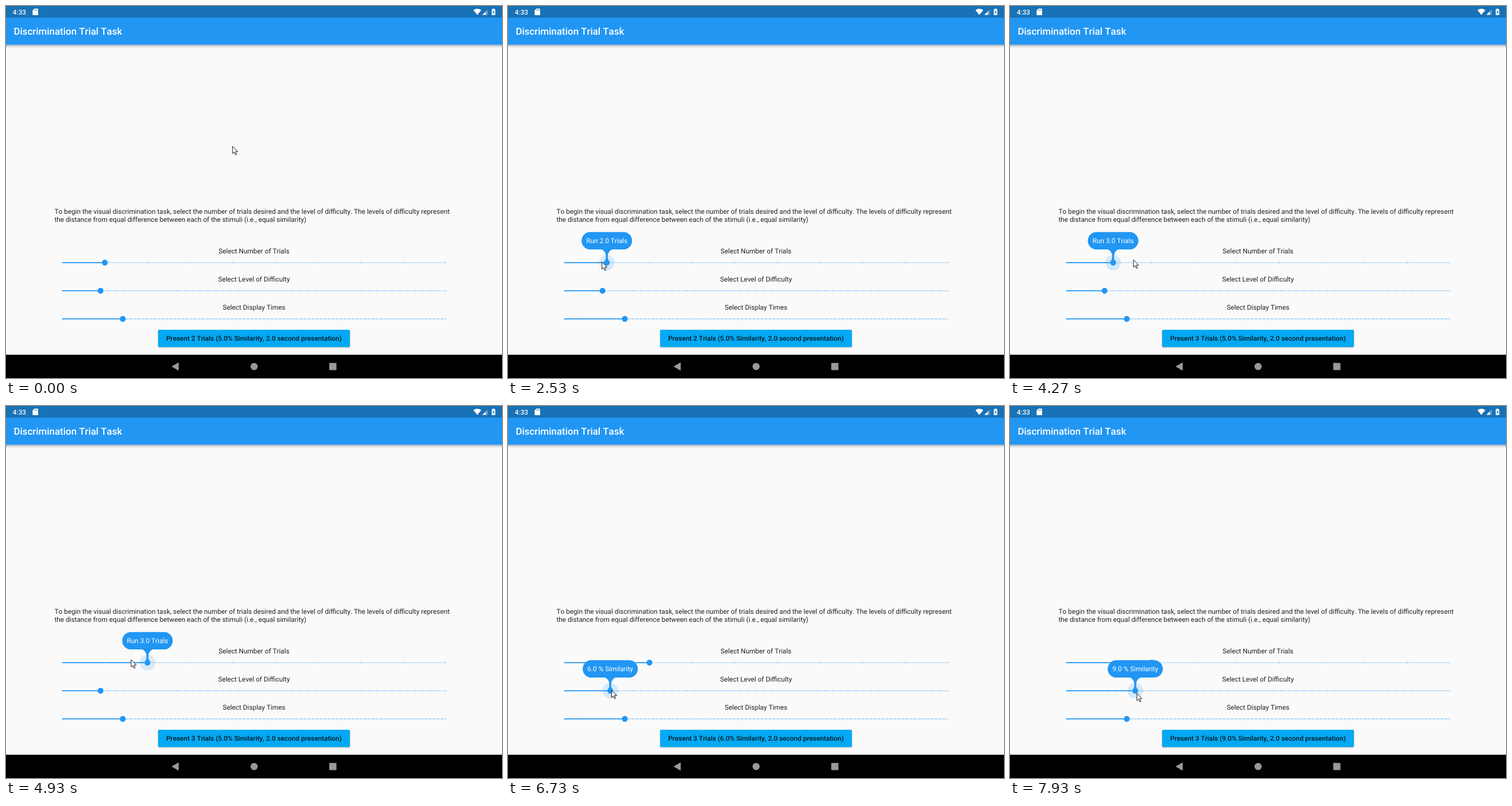
Animation of 864x648 px, one loop 8000 ms. Source, as an HTML page:

```html
<!DOCTYPE html>
<html lang="en">
<head>
<meta charset="utf-8">
<title>Discrimination Trial Task</title>
<style>
  html, body { margin: 0; width: 100%; height: 100%; overflow: hidden; background: #fafafa; }
  svg { display: block; width: 864px; height: 648px; }
  text {
    font: 400 11.8125px Roboto, sans-serif; font-kerning: none;
    fill: rgba(0, 0, 0, .87); text-rendering: geometricPrecision;
  }
  .mid { text-anchor: middle; }
  .medium { font-weight: 500; }
  .light { fill: #fff; }
  .title { font-size: 16.875px; }
  .button { filter: drop-shadow(0 1px 1.1px rgba(0, 0, 0, .3)); }
</style>
</head>
<body>
<svg viewBox="0 0 864 648">
  <defs>
    <linearGradient id="shade" x1="0" y1="0" x2="0" y2="1">
      <stop offset="0" stop-opacity=".32"/>
      <stop offset=".4" stop-opacity=".14"/>
      <stop offset="1" stop-opacity="0"/>
    </linearGradient>
  </defs>
  <rect width="864" height="648" fill="#fafafa"/>

  <rect y="67.5" width="864" height="6" fill="url(#shade)"/>
  <rect width="864" height="67.5" fill="#2196f3"/>
  <rect width="864" height="20.25" fill="#1971b6"/>
  <text class="medium light" x="11.8" y="14.8">4:33</text>
  <g fill="#fff">
    <path d="M49.4 4.6H55q1 0 1 1V15q0 1-1 1H47.3q-1 0-1-1V7.7Z"/>
    <path d="M814.2 7.3Q821 2.4 827.9 7.3L821 15.6Z"/>
    <path d="M839.3 6V15.5H829.8Z" opacity=".35"/>
    <path d="M835.6 9.7V15.5H829.8Z"/>
    <path d="M848 4.6h2.4v1h1q.9 0 .9.9v8.4q0 .9-.9.9h-4.4q-.9 0-.9-.9V6.5q0-.9.9-.9h1Z"/>
  </g>
  <path d="M849.7 7.2v3h1.5l-2.4 4v-3h-1.5Z" fill="#1971b6"/>
  <path d="M50 6.1v2.2M52 6.1v2.2M54 6.1v2.2" stroke="#1971b6" stroke-width=".9"/>
  <text class="medium light title" x="13.5" y="49.9">Discrimination Trial Task</text>

  <text x="84.4" y="362">To begin the visual discrimination task, select the number of trials desired and the level of difficulty. The levels of difficulty represent</text>
  <text x="84.4" y="375.6">the distance from equal difference between each of the stimuli (i.e., equal similarity)</text>

  <g id="sliders"></g>

  <rect class="button" x="265" y="564" width="334" height="30" rx="1.7" fill="#03a9f4"/>
  <text id="label" class="mid medium" x="431.9" y="583.2"></text>

  <rect y="607.5" width="864" height="40.5"/>
  <g fill="#999">
    <path d="M300.3 621.6V634.4L289.2 628Z" stroke="#999" stroke-linejoin="round"/>
    <circle cx="432.2" cy="628" r="6.2"/>
    <rect x="563.1" y="621.8" width="12.5" height="12.5" rx="1"/>
  </g>

  <g id="bubbles"></g>
  <path id="cursor" d="M0 0V12.7L2.9 10L5 14.8L7 13.9L4.9 9.3H9Z" fill="#fff" stroke="#000" stroke-width=".9"/>
</svg>
<script>
const FPS = 15, LOOP = 8000, LEFT = 97.9, WIDTH = 668.3, BLUE = '#2196f3';
const $ = id => document.getElementById(id);

function add(parent, tag, attrs, text = '') {
  const el = document.createElementNS('http://www.w3.org/2000/svg', tag);
  for (const k in attrs) el.setAttribute(k, attrs[k]);
  el.textContent = text;
  parent.append(el);
  return el;
}

// changes: clock ticks at which the value goes up by one
const sliders = [
  { name: 'Select Number of Trials', divs: 9, from: 1, value: 2,
    changes: [64], show: 32, hide: 74, half: 44, tip: v => `Run ${v}.0 Trials` },
  { name: 'Select Level of Difficulty', divs: 50, from: 0, value: 5,
    changes: [97, 103, 109, 114], show: 88, hide: Infinity, half: 48, tip: v => `${v}.0 % Similarity` },
  { name: 'Select Display Times', divs: 95, from: 0, value: 15, changes: [] }
];

// the pointer glides to x, y between two ticks; bend shapes the rise of y
const home = { x: 394.7, y: 244.4 };
const glides = [
  { start: 12, end: 26, x: 171.5, y: 444.2, bend: .6 },
  { start: 33, end: 45, x: 141.5, y: 447, bend: .5 },
  { start: 49, end: 66, x: 218, y: 442, bend: 1 },
  { start: 73, end: 86, x: 169.5, y: 494.8, bend: .4 },
  { start: 92, end: 119, x: 221.2, y: 500.6, bend: 2 }
];

function build(s, i) {
  const g = $('sliders'), end = LEFT + WIDTH;
  s.y = 447.1 + 49 * i;
  const line = (x2, color, extra) =>
    add(g, 'line', { x1: LEFT, x2, y1: s.y, y2: s.y, stroke: color, 'stroke-width': 1.7, ...extra });
  const dots = { 'stroke-dasharray': `0 ${WIDTH / s.divs}`, 'stroke-linecap': 'round', 'stroke-opacity': .54 };
  add(g, 'text', { class: 'mid', x: 432, y: s.y - 16.1 }, s.name);
  line(end, '#c6e2f8');
  line(end + .1, BLUE, dots);
  s.active = [line(end, BLUE), line(end, '#bbdefb', dots)];
  s.halo = add(g, 'circle', { cy: s.y, fill: BLUE, 'fill-opacity': .17 });
  s.thumb = add(g, 'circle', { cy: s.y, r: 5.1, fill: BLUE });
  if (!s.tip) return;
  s.bubble = add($('bubbles'), 'g', { fill: BLUE });
  add(s.bubble, 'rect', { x: -s.half, y: -53.4, width: 2 * s.half, height: 30.4, rx: 15.2 });
  add(s.bubble, 'path', { d: 'M-13-23.5A11.3 11.3 0 0 1-1.7-12.2V-8Q-1.8-5-3.6-3.600H3.6Q1.8-5 1.7-8V-12.2A11.3 11.3 0 0 1 13-23.5Z' });
  s.text = add(s.bubble, 'text', { class: 'mid light', y: -33.9 });
}

// three-tick step: first glimpse, nearly there, settled
const step = (n, start, first) => n < start ? 0 : [first, .9][n - start] ?? 1;

function update(s, n) {
  const moved = s.changes.reduce((sum, k) => sum + step(n, k, .1), 0);
  const x = LEFT + WIDTH * (s.value - s.from + moved) / s.divs;
  const now = s.value + s.changes.filter(k => n >= k).length;
  s.active.forEach(l => l.setAttribute('x2', x));
  s.thumb.setAttribute('cx', x);
  if (s.tip) {
    const size = step(n, s.show, .3) - step(n, s.hide, .2);
    s.halo.setAttribute('cx', x);
    s.halo.setAttribute('r', 13.5 * size);
    s.bubble.setAttribute('transform', `translate(${x} ${s.y}) scale(${size})`);
    s.bubble.style.display = size > 0 ? '' : 'none';
    s.text.textContent = s.tip(now);
  }
  return now;
}

function pointer(n) {
  let { x, y } = home;
  for (const g of glides) {
    const u = Math.min(1, Math.max(0, (n - g.start) / (g.end - g.start)));
    const e = u * u * (3 - 2 * u);
    x += (g.x - x) * e;
    y += (g.y - y) * e ** g.bend;
  }
  return `translate(${x} ${y})`;
}

function draw(ms) {
  const n = Math.floor((ms % LOOP) * FPS / 1000);
  const [trials, level] = sliders.map(s => update(s, n));
  $('label').textContent = `Present ${trials} Trials (${level}.0% Similarity, 2.0 second presentation)`;
  $('cursor').setAttribute('transform', pointer(n));
}

sliders.forEach(build);
draw(0);
const begin = performance.now();
requestAnimationFrame(function tick() {
  draw(performance.now() - begin);
  requestAnimationFrame(tick);
});
</script>
</body>
</html>
```
